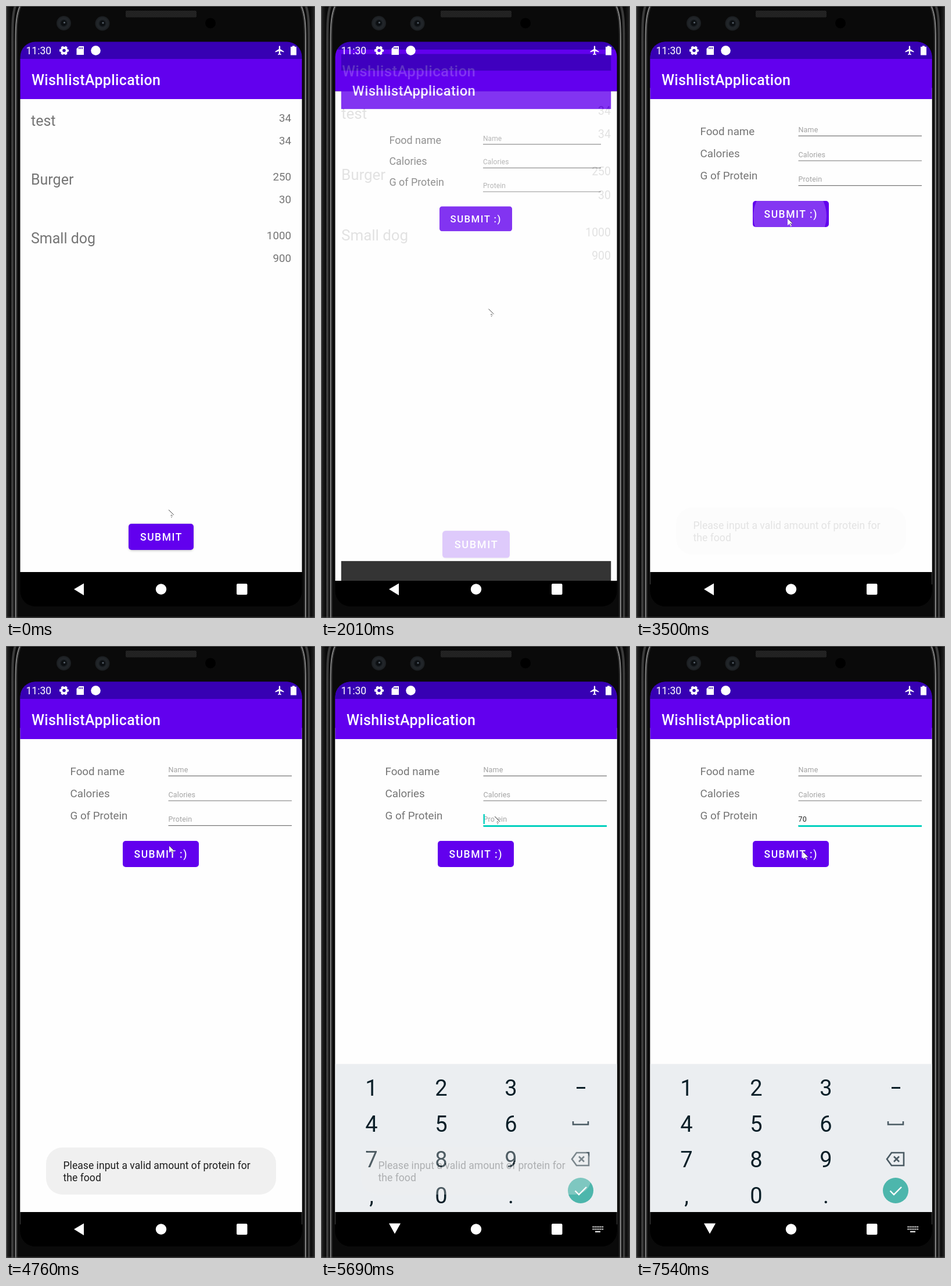
An HTML page for the animation above (8 s loop, 532 by 1052 pixels).

```html
<!DOCTYPE html>
<html lang="en">
<head>
<meta charset="utf-8">
<title>Wishlist</title>
<style>
  html, body { margin: 0; width: 100%; height: 100%; overflow: hidden; background: #0a0a0a; }
  svg { display: block; width: 532px; height: 1052px; font-family: Roboto, sans-serif; }
  .title { font-size: 25px; font-weight: 500; letter-spacing: .014em; fill: #fff; }
  .name { font-size: 25px; fill: #757575; }
  .body { font-size: 18.75px; fill: #757575; }
  .num { text-anchor: end; }
  .hint { font-size: 12.5px; letter-spacing: .012em; fill: #a2a2a2; }
  .btn { font-size: 17.5px; font-weight: 500; letter-spacing: .0893em; fill: #fff; }
  .key { font-size: 38px; text-anchor: middle; fill: #0b1f28; }
  .toast { font-size: 17.5px; letter-spacing: .003em; fill: #1c1c1c; }
</style>
</head>
<body>
<svg viewBox="0 0 532 1052">
  <defs>
    <clipPath id="screenClip"><rect x="24.5" y="61.5" width="485" height="970.5" rx="26"/></clipPath>
    <clipPath id="listBtnClip"><rect x="211" y="890" width="112" height="45" rx="5"/></clipPath>
    <clipPath id="formBtnClip"><rect x="201" y="335" width="131" height="45" rx="5"/></clipPath>
    <pattern id="mesh" width="3" height="3" patternUnits="userSpaceOnUse">
      <rect width="3" height="3" fill="#2e2e2e"/>
      <path d="M0 0h1.5v1.5H0zM1.5 1.5H3V3H1.5z" fill="#161616"/>
    </pattern>
    <linearGradient id="edge">
      <stop offset="0" stop-color="#3a3a3a"/><stop offset=".35" stop-color="#1c1c1c"/><stop offset="1" stop-color="#080808"/>
    </linearGradient>
    <radialGradient id="lens">
      <stop offset="0" stop-color="#3a4048"/><stop offset=".3" stop-color="#14181c"/>
      <stop offset=".65" stop-color="#23272b"/><stop offset="1" stop-color="#1a1d20"/>
    </radialGradient>
    <filter id="blur" x="-10%" y="-20%" width="120%" height="160%"><feGaussianBlur stdDeviation="2"/></filter>

    <g id="side" fill="none">
      <rect width="9" height="1052" fill="url(#edge)"/>
      <path d="M.5 0V1052" stroke="#5a5a5a"/>
      <path d="M16 0C11.500 14 11 30 11 60V1052" stroke="#3c3c3c" stroke-width="4"/>
      <path d="M24 0C18 14 16.500 30 16.500 60V1052" stroke="#858585" stroke-width="2"/>
      <path d="M26 0C20 14 18.700 30 18.700 60V1052" stroke="#333" stroke-width="1.4"/>
    </g>
    <g id="lensUnit"><circle r="12.5" fill="url(#lens)"/><circle r="5" fill="#0c0f12"/><circle cx="1" cy="-1" r="1.6" fill="#56606a"/></g>
    <g id="window">
      <rect x="24" y="61" width="486" height="31" fill="#3700b3"/>
      <rect x="24" y="160" width="486" height="813" fill="#fefefe"/>
      <rect x="24" y="91" width="486" height="69" fill="#6200ee"/>
      <rect x="24" y="973" width="486" height="60"/>
      <text class="title" x="44" y="135.7">WishlistApplication</text>
    </g>
  </defs>

  <rect width="532" height="1052" fill="#0a0a0a"/>
  <use href="#side"/>
  <use href="#side" transform="matrix(-1 0 0 1 532.5 0)"/>
  <path d="M0 .5H532M0 1051H532" stroke="#5c5c5c"/>
  <rect x="206" y="8" width="122" height="11.5" rx="2" fill="url(#mesh)"/>
  <use href="#lensUnit" x="99.5" y="29.5"/>
  <use href="#lensUnit" x="166" y="30"/>
  <circle cx="352" cy="29.5" r="9"/>

  <g clip-path="url(#screenClip)">
    <g id="list">
      <use href="#window"/>
      <g id="rows"></g>
      <rect id="listShadow" x="212" width="110" height="45" rx="5" opacity=".25" filter="url(#blur)"/>
      <g clip-path="url(#listBtnClip)">
        <rect x="211" y="890" width="112" height="45" fill="#6200ee"/>
        <circle id="listRipple" cx="267" cy="912" fill="#fff"/>
      </g>
      <text class="btn" x="231" y="919">SUBMIT</text>
    </g>

    <g id="form">
      <use href="#window"/>
      <g id="fields"></g>
      <path id="focusLine" d="M279.5 309.5H492" stroke="#03d0be" stroke-width="3"/>
      <text id="typed" class="hint" x="279.5" y="302.3" style="fill:#222"></text>
      <rect id="caret" y="289" width="2.4" height="17" fill="#03d0be"/>
      <g clip-path="url(#formBtnClip)">
        <rect x="201" y="335" width="131" height="45" fill="#6200ee"/>
        <circle id="formRipple" cx="265" cy="361" fill="#fff"/>
      </g>
      <text class="btn" x="220.5" y="364">SUBMIT :)</text>
    </g>

    <g id="keyboard">
      <rect x="24" y="718.5" width="486" height="254.5" fill="#ebeef1"/>
      <g id="keys"></g>
      <path d="M440 759.5H455" stroke="#0b1f28" stroke-width="2.8"/>
      <g fill="none" stroke="#4a5a63" stroke-width="2.6">
        <path d="M434 817V822.5H460V817"/>
        <path d="M440 871H461V893H440L432 882ZM444 877.5l9 9m0-9l-9 9"/>
      </g>
      <circle cx="447" cy="936" r="22" fill="#4db6ac"/>
      <path d="M437.5 936.5l6.5 6.5 13-13" fill="none" stroke="#fff" stroke-width="2.4"/>
    </g>

    <g fill="#fff">
      <path id="back" d="M117 1002.5L134 992.5V1013Z"/>
      <g id="imeNav">
        <path d="M117 992.5H137L127 1010.5Z"/>
        <path d="M467.5 998.5H486M467.5 1002.5H486" stroke="#fff" stroke-width="2" stroke-dasharray="2.2 1.1"/>
        <path d="M472 1006.8H481" stroke="#fff" stroke-width="2"/>
      </g>
      <circle cx="267" cy="1002.5" r="9.2"/>
      <rect x="397" y="993" width="18.5" height="19" rx="2"/>
    </g>

    <g id="toast">
      <rect x="69" y="862" width="396" height="81" rx="28" fill="#f0f0f0"/>
      <text class="toast" x="98.5" y="899.3">Please input a valid amount of protein for</text>
      <text class="toast" x="98.5" y="919.8">the food</text>
    </g>

    <g fill="#fff">
      <text x="34.5" y="83" font-size="17.5">11:30</text>
      <g fill="none" stroke="#fff" transform="translate(100 76.5)">
        <circle r="4.6" stroke-width="3.6"/>
        <circle r="6.7" stroke-width="2.6" stroke-dasharray="4 3.016" stroke-dashoffset="2"/>
      </g>
      <path d="M126 69H134V84H121.5V73.5Z"/>
      <path d="M126 71V74M128.7 71V74M131.4 71V74" stroke="#3700b3" stroke-width="1.3"/>
      <circle cx="154.5" cy="76.5" r="8.3"/>
      <path transform="translate(462 67) scale(.78)" d="M21 16v-2l-8-5V3.5a1.5 1.5 0 0 0-3 0V9l-8 5v2l8-2.5V19l-2 1.5V22l3.5-1 3.5 1v-1.5L13 19v-5.5z"/>
      <path d="M490 70H493V68.5H497V70H500V84.5H490Z"/>
    </g>
  </g>

  <g id="cursor">
    <path d="M0 0V12L3 9.5L5 14L7 13L5 8.8H8.8Z" fill="#fff"/>
    <path d="M0 0L8.8 8.8M3.5 10l1.600-1 1.600 1.700M4.300 12.400h1.600" fill="none" stroke="#333" stroke-width=".9"/>
  </g>
</svg>

<script>
const LOOP = 8000;
const STEP = 135, LEAD = 38; // the screen refreshes in coarse, even steps
const FOCUS = 5350;
const KEYSTROKES = [{ time: 6700, char: '7' }, { time: 6970, char: '0' }];

const HOME = { x: 280, y: 866 };
const MOVES = [
  { from: 0, to: 637, x: 264, y: 906 },
  { from: 1447, to: 2257, x: 262, y: 390, power: 1.25, bow: 30 },
  { from: 2527, to: 2797, x: 261, y: 365 },
  { from: 4552, to: 4957, x: 297, y: 326, power: 2 },
  { from: 4957, to: 5362, x: 299, y: 293, power: 2 },
  { from: 6712, to: 7387, x: 288, y: 354 }
];

const $ = id => document.getElementById(id);
const set = (id, attrs) => {
  for (const name in attrs) $(id).setAttribute(name, attrs[name]);
};
const show = (id, visible) => set(id, { visibility: visible ? 'visible' : 'hidden' });
const label = (cls, x, y, text) => `<text class="${cls}" x="${x}" y="${y}">${text}</text>`;
const ramp = (t, from, to) => Math.min(1, Math.max(0, (t - from) / (to - from)));
const easeOut = (p, power) => 1 - (1 - p) ** power;
const zoom = s => `translate(267 546.5) scale(${s}) translate(-267 -546.5)`;

$('rows').innerHTML = [['test', 34, 34], ['Burger', 250, 30], ['Small dog', 1000, 900]]
  .map(([name, top, bottom], i) => {
    const y = 101 * i;
    return label('name', 43, 206 + y, name) +
      label('body num', 491, 199 + y, top) + label('body num', 491, 238 + y, bottom);
  }).join('');

$('fields').innerHTML = [['Food name', 'Name'], ['Calories', 'Calories'], ['G of Protein', 'Protein']]
  .map(([name, hint], i) => {
    const y = 42.7 * i;
    return label('body', 110.5, 222.4 + 37.8 * i, name) +
      `<g id="hint${i}">${label('hint', 279.5, 217 + y, hint)}</g>` +
      `<path d="M279.5 ${223.3 + y}H492" stroke="#777" stroke-width="1.2"/>`;
  }).join('');

$('keys').innerHTML = [...'123456789,0.']
  .map((key, i) => label('key', 87 + 120 * (i % 3), 773 + 61.5 * Math.floor(i / 3), key)).join('');

function cursorAt(t) {
  let { x, y } = HOME;
  for (const { from, to, x: endX, y: endY, power = 1, bow = 0 } of MOVES) {
    const p = ramp(t, from, to);
    const k = easeOut(p, power);
    x += (endX - x) * k + bow * Math.sin(Math.PI * p);
    y += (endY - y) * k;
  }
  return `translate(${x} ${y})`;
}

// Grows to a held size while pressed, then spreads and fades after release.
function ripple(id, t, press, release, fade) {
  const spread = ramp(t, release, release + fade);
  set(id, {
    r: 39 * ramp(t, press, press + 164) + 60 * spread,
    opacity: .36 * (1 - spread)
  });
}

function renderInput(t) {
  const keys = KEYSTROKES.filter(key => key.time <= t);
  const lastEvent = keys.length ? keys.at(-1).time : FOCUS;
  $('typed').textContent = keys.map(key => key.char).join('');
  set('caret', { x: 279.5 + 6.9 * keys.length });
  show('caret', t >= FOCUS && Math.floor((t - lastEvent) / 500) % 2 === 0);
  show('focusLine', t >= FOCUS);
  show('hint2', !keys.length);
}

function render(time) {
  const t = Math.floor((time + LEAD) / STEP) * STEP - LEAD;
  set('cursor', { transform: cursorAt(t) });

  const opened = easeOut(ramp(t, 1916, 2316), 6.25);
  set('list', { transform: zoom(1 + .05 * opened) });
  set('form', { transform: zoom(.85 + .15 * opened), opacity: ramp(t, 1916, 2005) });

  ripple('listRipple', t, 1148, 1480, 330);
  ripple('formRipple', t, 3160, 3300, 430);
  set('listShadow', { y: 891 + 4 * ramp(t, 1148, 1300) * (1 - ramp(t, 1480, 1810)) });

  set('toast', { opacity: ramp(t, 3420, 3870) * (1 - ramp(t, 5235, 5800)) });

  const raised = ramp(t, 5420, 5630);
  set('keyboard', {
    transform: `translate(0 ${40 * (1 - raised) ** 2})`,
    opacity: raised && .5 + .5 * raised
  });
  show('imeNav', raised);
  show('back', !raised);
  renderInput(t);
}

const start = performance.now();
function tick() {
  render((performance.now() - start) % LOOP);
  requestAnimationFrame(tick);
}
tick();
</script>
</body>
</html>
```
